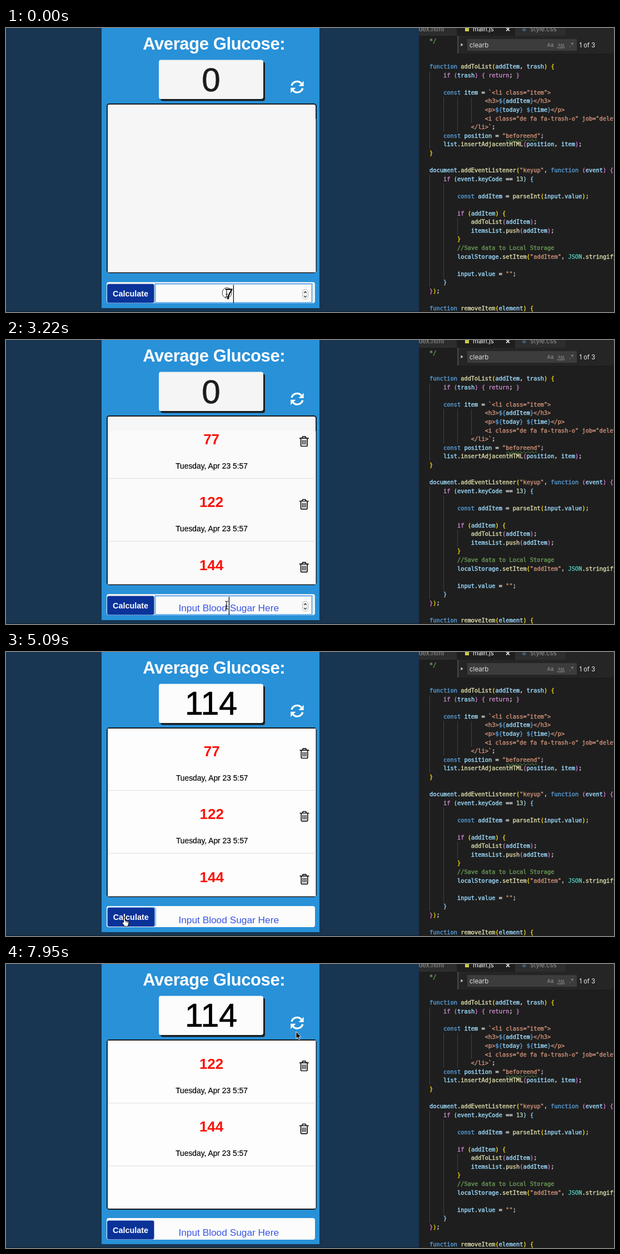
These frames come from a looping animation (1094 by 512 pixels, 8 s). An HTML page:

```html
<!DOCTYPE html>
<html lang="en">
<head>
<meta charset="utf-8">
<title>Average Glucose</title>
<style>
html, body { margin: 0; width: 100%; height: 100%; overflow: hidden; background: #183551; }
svg, pre { position: absolute; }
svg { left: 0; top: 0; }
text { font-family: "Liberation Sans", Arial, sans-serif; }
.mid { text-anchor: middle; }
.bold { font-weight: bold; }
.date { stroke: #000; stroke-width: .2; }
.ui { font-family: Inter, "Open Sans", sans-serif; fill: #969696; }
.line { fill: none; stroke-linecap: round; stroke-linejoin: round; }
pre {
  left: 762px; top: 15.5px; width: 332px; height: 496.5px; margin: 0; overflow: hidden;
  font: 10.37px/15.57px "DejaVu Sans Mono", "Liberation Mono", monospace; color: #d4d4d4;
  -webkit-text-stroke: .4px;
}
.comment { color: #6a9955; }
.string { color: #ce9178; }
.keyword { color: #569cd6; }
.control { color: #c586c0; }
.call { color: #dcdcaa; }
.number { color: #b5cea8; }
.type { color: #4ec9b0; }
.name { color: #9cdcfe; }
.b0 { color: #ffd700; }
.b1 { color: #da70d6; }
.b2 { color: #87cefa; }
pre u { text-decoration: underline wavy #4a9a3a .8px; text-underline-offset: 2px; }
</style>
</head>
<body>
<svg width="1094" height="512" viewBox="0 0 1094 512">
  <defs>
    <clipPath id="listClip"><rect x="183" y="138" width="374.5" height="302.5"/></clipPath>
    <clipPath id="barClip"><rect x="181" y="458" width="375" height="39"/></clipPath>
    <g id="trash" class="line" stroke-width="1.7">
      <path d="M-7.8-5.6H7.8M-3.6-6l1-2.6h5.2l1 2.6M-5.8-5V7q0 1.8 1.8 1.8h8q1.8 0 1.8-1.8V-5"/>
      <path d="M-2.8-2V5.4M0-2V5.4M2.8-2V5.4" stroke-width="1.4"/>
    </g>
    <g id="turn">
      <path d="M1.9 9.4A10.3 10.3 0 0 1 19.4 5.2" fill="none" stroke="#fff" stroke-width="3.3"/>
      <path d="M23.6.9v9.3h-9.3z" fill="#fff"/>
    </g>
  </defs>

  <rect width="743" height="512" fill="#183551"/>
  <rect y="510.5" width="743" height="1.5" fill="#10283d"/>
  <rect x="172" width="392" height="505" fill="#2891d8"/>
  <text class="mid bold" x="374.2" y="39.3" font-size="31" letter-spacing="-.4" fill="#fff">Average Glucose:</text>
  <rect x="278" y="61" width="188" height="70.5" rx="4" fill="#1b1d20"/>
  <rect id="box" x="275" y="57.5" width="188" height="70.5" rx="4"/>
  <text id="average" class="mid" x="369" stroke-width=".7"></text>
  <g transform="translate(512 94.5)">
    <use href="#turn"/>
    <use href="#turn" transform="rotate(180 11.9 11.7)"/>
  </g>

  <rect id="frame" x="182" y="137" width="376" rx="4" fill="#f6f6f6" stroke="#181a1c" stroke-width="1.9"/>
  <g clip-path="url(#listClip)">
    <rect id="fill" x="183" width="375" height="310"/>
    <g id="items"></g>
  </g>

  <rect id="tray" x="181" y="458" width="375" rx="4"/>
  <g id="bar">
    <g id="focus">
      <rect x="268.5" y="461.3" width="282" height="34" fill="#fafafa" stroke="#78b5ee" stroke-width="2.4"/>
      <rect x="533.5" y="471.5" width="10" height="17.5" rx="4.5" fill="#fdfdfd" stroke="#b4b4b4"/>
      <path class="line" d="M536.3 477.6l2.2-2.6 2.2 2.6M536.3 483l2.2 2.6 2.2-2.6" stroke="#333" stroke-width="1.2"/>
    </g>
    <g id="button">
      <rect id="ring" x="181.5" y="460" width="88" height="35.5" rx="4" fill="#8fc3f3"/>
      <rect x="182" y="461.5" width="84.5" height="34" rx="3" fill="#0a3299"/>
      <text class="mid bold" x="224" y="483.6" font-size="14.4" fill="#fff">Calculate</text>
    </g>
    <g clip-path="url(#barClip)">
      <text id="hint" class="mid" x="400.7" y="489" font-size="17.3" fill="#3a55e6">Input Blood Sugar Here</text>
      <text id="typed" class="mid" x="401" y="489" font-size="28"></text>
    </g>
    <rect id="caret" y="463" width="1.2" height="33"/>
    <ellipse id="halo" cx="397.5" cy="477.5" rx="8.3" ry="9.5" fill="none" stroke="#222" stroke-width=".9"/>
  </g>

  <g id="cursor">
    <path id="beam" class="line" stroke="#111" stroke-width="1.1" d="M-2.5-7Q0-7 0-5.5Q0-7 2.5-7M0-5.5V5.5M-2.5 7Q0 7 0 5.5Q0 7 2.5 7M-1.5 2h3"/>
    <path id="hand" fill="#fff" stroke="#111" stroke-width="1.1" d="M-1.4 9.2V1.4a1.4 1.4 0 0 1 2.8 0V6l4.8 1q2 .5 1.8 2.5l-.8 4-1 3H.2L-3.8 11q-.9-1.8.7-2zM3.2 6.5V9.5M5.6 7V9.8"/>
    <path id="arrow" fill="#000" stroke="#fff" stroke-width=".9" d="M0 0V12.6l2.9-2.7 2 4.6 2.1-.9-2-4.4h3.9z"/>
  </g>

  <rect x="743" width="351" height="512" fill="#1e1e1e"/>
  <rect x="743" width="351" height="14" fill="#252526"/>
  <rect x="743" width="68" height="14" fill="#2d2d2d"/>
  <rect x="811" width="105" height="14" fill="#1e1e1e"/>
  <rect x="916" width="91" height="14" fill="#2d2d2d"/>
  <g font-size="11.3">
    <text class="ui" x="742.5" y="6">dex.html</text>
    <rect x="826" y="-1" width="7" height="7" fill="#cbcb41"/>
    <text class="ui" x="840" y="6" style="fill:#fff">main.js</text>
    <path class="line" d="M900.5 0l5 5M905.5 0l-5 5" stroke="#fff" stroke-width="1.5"/>
    <text class="ui" x="929" y="6" style="fill:#519aba">#</text>
    <text class="ui" x="943.5" y="6">style.css</text>
  </g>
  <rect x="812" y="14" width="282" height="32" fill="#252526"/>
  <rect x="812" y="14" width="2.5" height="32" fill="#454545"/>
  <rect x="830" y="20" width="197" height="21" fill="#3c3c3c"/>
  <path d="M818.5 27.3l4 3-4 3z" fill="#c5c5c5"/>
  <text class="ui" x="834" y="35" font-size="11.6" style="fill:#ddd">clearb</text>
  <text class="ui" x="973.5" y="34" font-size="9.5">Aa</text>
  <text class="ui" x="993" y="33.5" font-size="7.5">Abl</text>
  <path d="M992 36v-1M992 35.8h13v-1" fill="none" stroke="#969696"/>
  <text class="ui" x="1013" y="34" font-size="11">.*</text>
  <text class="ui" x="1031.5" y="34.8" font-size="11.2" style="fill:#f0f0f0">1 of 3</text>
  <g id="guides" fill="#404040"></g>
</svg>
<pre id="code"></pre>

<script>
const $ = id => document.getElementById(id);
const LOOP = 8000, CLICK = 5000, REMOVE = 6970;

// Syntax-coloured editor text
const source = [
  '*/', '', '',
  'function addToList(addItem, trash) {',
  '    if (trash) { return; }', '',
  '    const item = `<li class="item">',
  '                <h3>${addItem}</h3>',
  '                <p>${today} ${time}</p>',
  '                <i class="de fa fa-trash-o" job="delete"></i>',
  '            </li>`;',
  '    const position = "beforeend";',
  '    list.insertAdjacentHTML(position, item);',
  '}', '',
  'document.addEventListener("keyup", function (event) {',
  '    if (event.keyCode == 13) {', '',
  '        const addItem = parseInt(input.value);', '',
  '        if (addItem) {',
  '            addToList(addItem);',
  '            itemsList.push(addItem);',
  '        }',
  '        //Save data to Local Storage',
  '        localStorage.setItem("addItem", JSON.stringify(itemsList));', '',
  '        input.value = "";',
  '    }',
  '});', '',
  'function removeItem(element) {'
].join('\n');

const kinds = ['comment', 'string', 'keyword', 'control', 'call', 'number', 'type', 'name', 'bracket'];
const token = /(\/\/.*|\*\/)|(`[^`]*`|"[^"\n]*")|\b(function|const)\b|\b(if|return)\b|(\w+)(?=\()|(\d+)|([A-Z]{3,})|(\w+)|([(){}])/g;
const span = (kind, text) => `<span class="${kind}">${text}</span>`;
let depth = 0;

function paint(text, ...groups) {
  let kind = kinds[groups.findIndex((g, i) => i < kinds.length && g !== undefined)];
  if (kind === 'bracket') {
    const level = '({'.includes(text) ? depth++ : --depth;
    kind = 'b' + level % 3;
  }
  if (kind === 'string') {
    text = text.replace(/</g, '&lt;')
      .replace(/\$\{(\w+)\}/g, (_, name) => span('keyword', '${' + span('name', name) + '}'))
      .replace('beforeend', '<u>beforeend</u>');
  }
  return span(kind, text);
}
$('code').innerHTML = source.replace(token, paint);

// Indent guides: level, first line, last line
$('guides').innerHTML = [[0, 4, 12], [1, 7, 10], [2, 7, 10], [3, 7, 9], [0, 16, 28], [1, 17, 27], [2, 21, 22]]
  .map(([level, from, to]) =>
    `<rect x="${762 + level * 25}" y="${15.5 + from * 15.57}" width="1" height="${(to - from + 1) * 15.57}"/>`)
  .join('');

// List rows
$('items').innerHTML = [0, 1, 2].map(i => `
  <g transform="translate(0 ${i * 113.4})">
    <text class="mid bold value" x="369.6" y="188" font-size="26" fill="#fb1108"></text>
    <text class="mid date" x="370" y="231.5" font-size="13.8">Tuesday, Apr 23 5:57</text>
    <rect x="183" y="249" width="375" height="1.2" fill="#e2e2e2"/>
    <use class="bin" href="#trash" x="536.3" y="182.7"/>
  </g>`).join('');
const rows = [...$('items').children];

// Timelines: [time, value...]
const typing = [[0, '7'], [90, '77'], [450, ''], [990, '1'], [1340, '12'], [1430, '122'], [1880, ''],
  [2240, '1'], [2780, '14'], [2950, '144'], [3220, '']];
const lists = [[0, []], [450, [77]], [1880, [77, 122]], [3220, [77, 122, 144]], [REMOVE, [122, 144]]];
const blink = [[0, true], [3760, false], [4240, true], [4730, false]];

const track = (start, step, points) => points.map(([x, y], i) => [start + i * step, x, y]);
const mouse = [
  [0, 397, 478],
  ...track(3760, 87.5, [[394, 478], [372, 478], [330, 479], [282, 479], [240, 479], [212, 479], [200, 478], [207, 478], [213, 478]]),
  ...track(5810, 87.5, [[228, 472], [300, 415], [395, 340], [476, 284], [521, 257], [532, 236], [536, 217], [537, 205], [536, 196], [535, 188]]),
  ...track(7770, 90, [[531, 166], [525, 136], [522, 122]])
];
const at = (list, t) => list.findLast(e => e[0] <= t + .5);

const show = (el, on) => el.setAttribute('visibility', on ? 'visible' : 'hidden');
const set = (el, attrs) => { for (const k in attrs) el.setAttribute(k, attrs[k]); };
const inside = (x, y, l, t, r, b) => x >= l && x <= r && y >= t && y <= b;

function render(t) {
  const clicked = t >= CLICK, drop = t >= REMOVE ? 1 : 0;
  const text = at(typing, t)[1], values = at(lists, t)[1];
  const [, x, y] = at(mouse, t);
  const overBin = inside(x, y, 527, 172, 546, 193);
  const overButton = inside(x, y, 182, 460, 267, 497);
  const pointer = overBin || overButton ? 'hand' : inside(x, y, 268, 460, 551, 497) ? 'beam' : 'arrow';
  const nudge = clicked && !drop ? .7 : 0;
  const ink = clicked ? '#000' : '#1c1c1c';

  $('average').textContent = clicked ? '114' : '0';
  set($('average'), { y: clicked ? 112.8 : 114.2, 'font-size': clicked ? 59 : 60, fill: ink, stroke: ink });
  set($('box'), { fill: clicked ? '#fcfcfc' : '#f5f5f5' });
  set($('fill'), { y: clicked ? 138 : 164, fill: clicked ? '#fdfdfd' : values.length ? '#fafafa' : '#f6f6f6' });
  set($('frame'), { height: 304 + drop });
  set($('items'), { transform: `translate(${nudge} ${drop})` });

  rows.forEach((row, i) => {
    show(row, i < values.length);
    row.querySelector('.value').textContent = values[i] ?? '';
    set(row.querySelector('.bin'), { stroke: overBin && i === 0 ? '#c81414' : '#111' });
  });

  set($('bar'), { transform: `translate(0 ${drop})` });
  set($('tray'), { height: 38 + drop, fill: clicked ? '#fcfcfc' : '#eef0f2' });
  set($('button'), { transform: `translate(${nudge} ${nudge && -.5})` });
  show($('focus'), !clicked);
  show($('ring'), clicked && !drop);
  show($('hint'), !text);
  $('typed').textContent = text;
  set($('caret'), { x: 401 + text.length * 7.8 - (text ? 0 : .2) });
  show($('caret'), at(blink, t)[1]);
  show($('halo'), t < 90);

  set($('cursor'), { transform: `translate(${x} ${y})` });
  for (const id of ['beam', 'hand', 'arrow']) show($(id), id === pointer);
}

const start = performance.now();
function tick() {
  render((performance.now() - start) % LOOP);
  requestAnimationFrame(tick);
}
tick();
</script>
</body>
</html>
```
